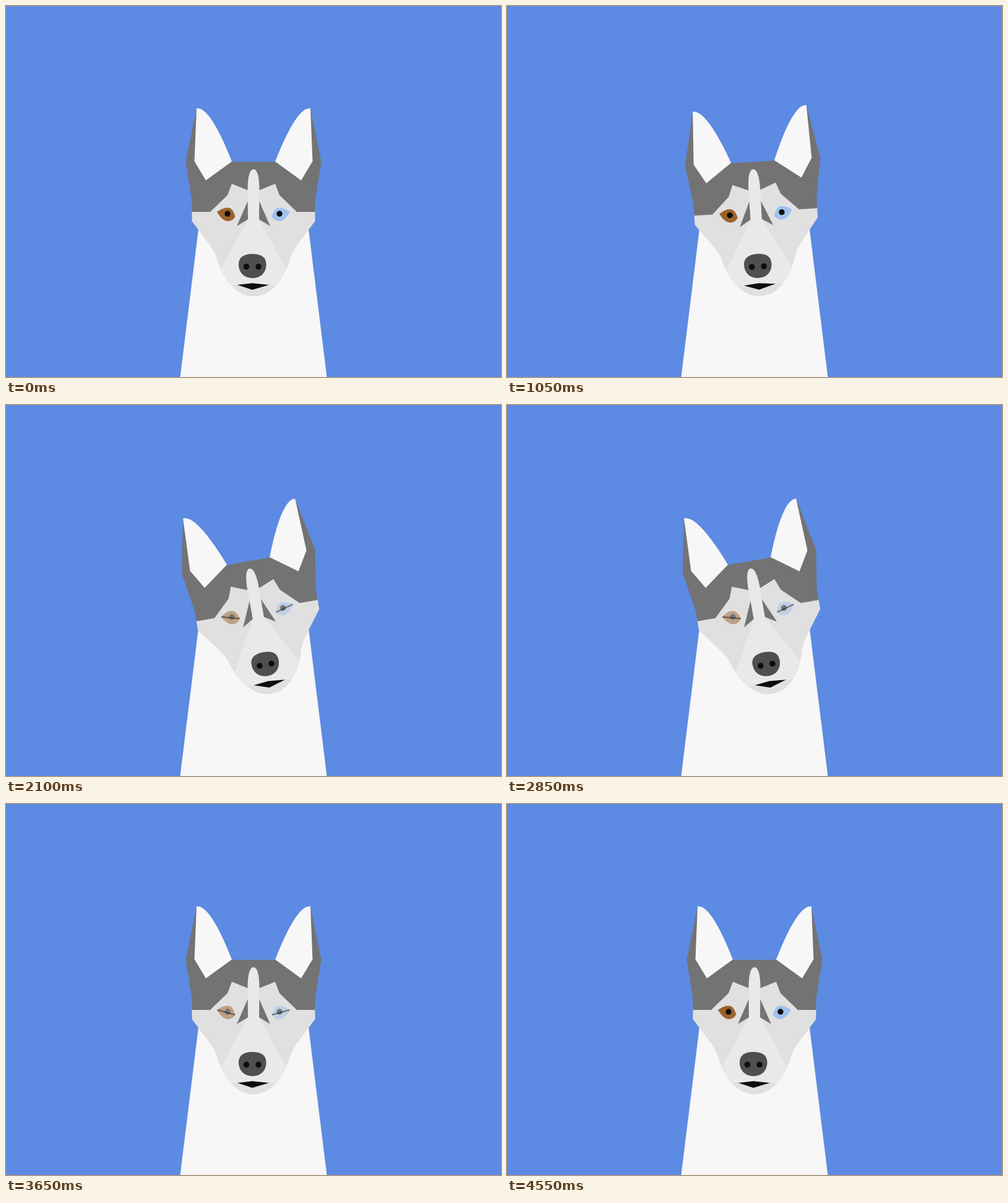
Recreate the animation shown at these times as an HTML page. Size 800x600 px, loop 5.25 s.

```html
<!DOCTYPE html>
<html lang="en">
<head>
<meta charset="utf-8">
<title>Husky</title>
<style>
html, body { margin: 0; width: 100%; height: 100%; overflow: hidden; background: #5d8ae2; }
svg { display: block; width: 100%; height: 100%; }
</style>
</head>
<body>
<svg viewBox="0 0 800 600">
  <defs>
    <!-- left half of the face, overlapping the centre line slightly -->
    <g id="half">
      <path fill="#e0e0e0" d="M300.5 330V348L329 386Q338 398 341 409Q343 417 347 425.5C352 437 357 445 364 452Q380 469.5 400 469.5H401V285H365Z"/>
      <path fill="#e9e9e9" d="M391 345L347 425.5C352 437 357 445 364 452Q382 448.5 401 448.5V345Z"/>
      <path fill="#737373" d="M290.5 252H401V298H391L365 287.5L358 306L330 333H300.5V315ZM391 315L373 356L391 345Z"/>
    </g>
    <g id="ear">
      <path fill="#737373" d="M308 166L290.5 252L301 290L323 282L330 240Z"/>
      <path fill="#f7f7f7" d="M308 165.5C325 163 346 203 365 251.5L323 282L304.5 251Z"/>
    </g>
    <g id="eye">
      <path fill="currentColor" d="M341 333Q351 326 357 326.3C364 326 367 330 370.5 340.5Q366 348 359 348C351 348 346 341 341 333Z"/>
      <circle cx="358" cy="336" r="4.7" fill="#0d0d0d"/>
    </g>
    <path id="lid" d="M341.5 333L370 341" stroke="#0d0d0d" stroke-width="2"/>
  </defs>

  <path fill="#f7f7f7" d="M313 345H487L518.5 600H281.5Z"/>
  <g id="head">
    <use href="#half"/>
    <use href="#half" transform="matrix(-1 0 0 1 800 0)"/>
    <use href="#ear"/>
    <g id="flick"><use href="#ear" transform="matrix(-1 0 0 1 800 0)"/></g>
    <path fill="#e9e9e9" d="M391 346L390.5 298C390.5 276 394 264 400 264C406 264 409.5 276 409.5 298L409 346Z"/>
    <g id="eyes">
      <use href="#eye" color="#9b632a"/>
      <use href="#eye" color="#a0c1ed" transform="matrix(-1 0 0 1 800 0)"/>
    </g>
    <g id="lids" opacity="0">
      <use href="#lid"/>
      <use href="#lid" transform="matrix(-1 0 0 1 800 0)"/>
    </g>
    <path fill="#4f4f4f" d="M398.3 401C412 401 420.5 406 420.5 418C420.5 431 412 440 398.3 440C385 440 376 431 376 418C376 406 385 401 398.3 401Z"/>
    <g fill="#0d0d0d">
      <circle cx="388.5" cy="421.5" r="4.8"/>
      <circle cx="408" cy="421.5" r="4.8"/>
      <path d="M374 451L398 448.3L425 451L398 459Z"/>
    </g>
  </g>
</svg>
<script>
const LOOP = 5250, STEP = 50;
const BLINKS = [500, 1950, 2800, 3600, 4350];
const [head, flick, eyes, lids] =
  ['head', 'flick', 'eyes', 'lids'].map(id => document.getElementById(id));

// rises from 0 to 1 and back within 200 ms
const pulse = (t, start) => Math.max(0, 1 - Math.abs(t - start - 100) / 100);

// quartic ease-out over 500 ms
const ease = (t, start) => {
  const p = Math.min(1, Math.max(0, (t - start) / 500));
  return 1 - (1 - p) ** 4;
};

function draw(t) {
  const tilt = -10 * (ease(t, 1000) - ease(t, 3000));
  const shut = Math.max(...BLINKS.map(start => pulse(t, start)));
  head.setAttribute('transform', `rotate(${tilt} 400 300)`);
  flick.setAttribute('transform', `rotate(${12 * pulse(t, 3750)} 477 282)`);
  eyes.setAttribute('opacity', 1 - shut);
  lids.setAttribute('opacity', shut);
}

const begin = performance.now();
function tick() {
  const t = (performance.now() - begin) % LOOP;
  draw(Math.floor(t / STEP) * STEP);
  requestAnimationFrame(tick);
}
tick();
</script>
</body>
</html>
```
